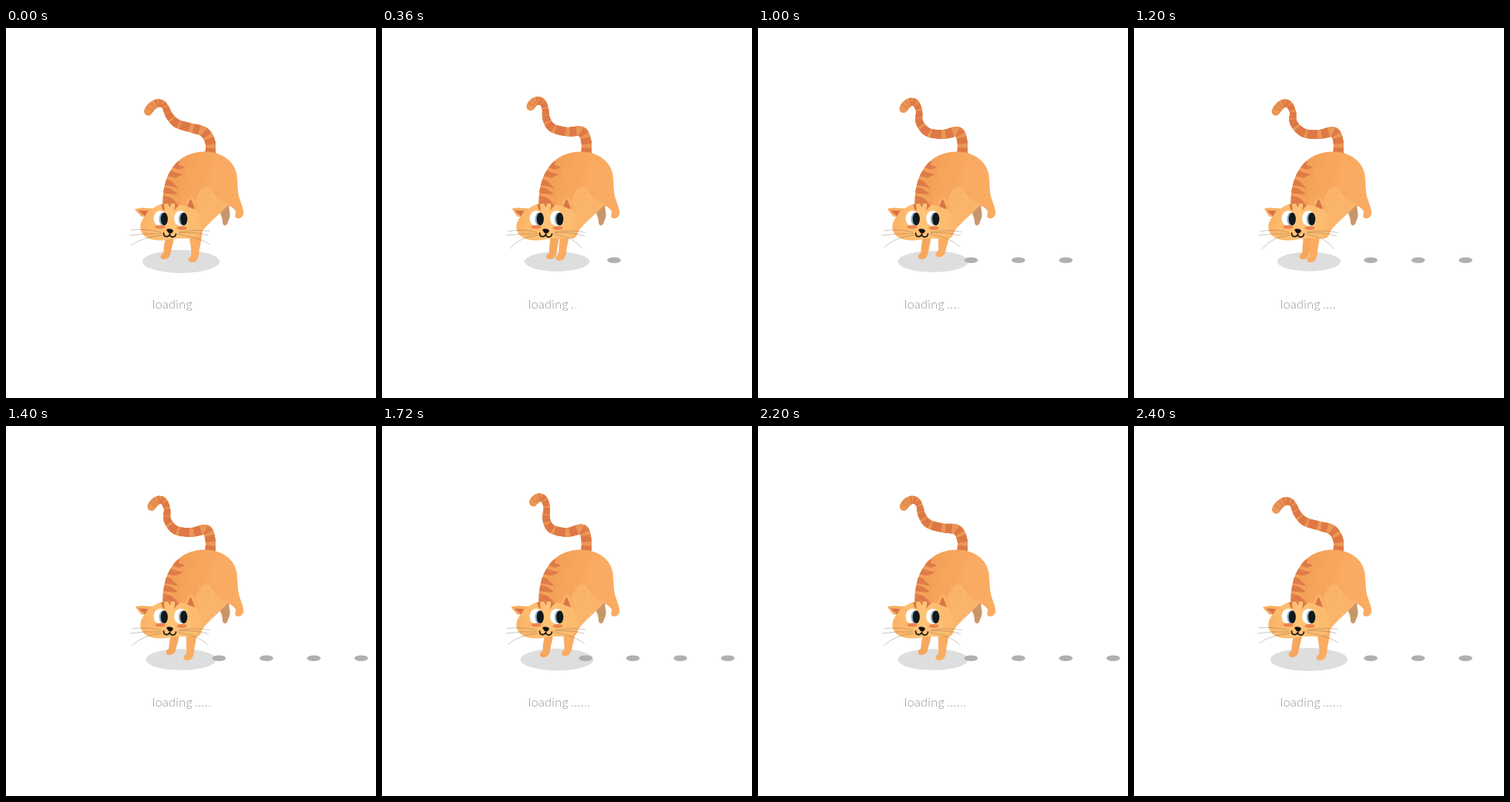
These frames come from a looping animation (480x480 px, 2.44 s). An HTML page with a canvas:

```html
<!DOCTYPE html>
<html lang="en">
<head>
<meta charset="utf-8">
<title>Loading cat</title>
<style>
html, body { margin: 0; width: 100%; height: 100%; overflow: hidden; background: #fff; }
canvas { display: block; }
</style>
</head>
<body>
<canvas id="stage" width="480" height="480"></canvas>
<script>
const ctx = document.getElementById('stage').getContext('2d');
const LOOP = 2440, STEP = 40;
const mix = (a, b, k) => a + (b - a) * k;
const clamp = v => Math.max(0, Math.min(1, v));

// Tail poses: matching spine points from the rump to the tip
const tailLow = [[265,163],[265,148],[257,135],[240,129.5],[222,124],[212,114],[207,103],[202,98],[195,98],[188,103],[184,109]];
const tailHigh = [[265,163],[265,147],[260,134],[240,138],[220,133],[214,120],[215,106],[212,95],[206,92],[201,94],[198,98]];
const tailBent = [[265,163],[265,147],[259,135],[240,138],[220,136],[207,123],[206,109],[201,99],[194,98],[187.5,103],[183.5,109]];
const tailWidths = [13, 13, 13, 11.5, 11, 9.5, 8, 9, 10.5, 11, 10.5];

const shapes = {
  farLeg: 'M277 238 L290 228 C288 235 292 241 290 246 L287 254 C284 258 281 256 281 252 C281 247 279 243 277 238 Z',
  body: 'M203.5 232 C203 212 206 195 216 181 C226 167 241 160.5 258 160.5 C280 160.5 297 173 299.5 191 C301 206 300 213 303 222 C306 230 308 236 308 241 C306 248 299 248 297.5 245 C297 241 300 239 296 235 L290 228 C280 238 268 248 258 259 C253 264 254 271 248 273 L215 273 Z',
  belly: 'M250 214 C255 203 264 204 268 212 C273 222 282 226 290 228 C280 238 268 248 258 259 C253 264 254 271 248 273 L238 273 C248 257 241 232 250 214 Z',
  haunch: 'M264 190 C267 177 287 179 296 190 C301 205 300 213 303 222 C306 230 308 236 308 241 C306 248 299 248 297.5 245 C297 241 300 239 296 235 C288 228 273 222 267 211 C263 204 263 197 264 190 Z',
  head: 'M182 242 C190 233 197 228 208 228 C218 227 227 229 234 231 L249 237 C254 245 256 262 249 270 C241 275 228 271 213 274 C202 277 186 276 179 269 C171 261 174 250 182 242 Z',
  stripes: 'M216 170 L225 173 L224 177 L232 181 L224 184 L214 180 Z M208 183 L219 187 L230 190 L220 194 L205 192 Z M203 194 L214 198 L224 208 L213 205 L203 204 Z M202 206 L213 208 L224 216 L211 215 L202 214 Z M202 217 L214 220 L223 228 L202 229 Z',
  brow: 'M201 229 L205 228 L206 237 L203 235 Z M210 228 L214 228 L213 233 Z M219 228 L225 229 L218 237 L219 232 Z'
};
for (const key in shapes) shapes[key] = new Path2D(shapes[key]);

function fill(path, color) {
  ctx.fillStyle = color;
  ctx.fill(path);
}

function oval(x, y, rx, ry, color) {
  ctx.fillStyle = color;
  ctx.beginPath();
  ctx.ellipse(x, y, rx, ry, 0, 0, 7);
  ctx.fill();
}

function stroke(path, color, width, cap = 'round') {
  ctx.strokeStyle = color;
  ctx.lineWidth = width;
  ctx.lineCap = cap;
  ctx.stroke(path);
}

// Catmull-Rom position at s, counted in points
function along(pts, s) {
  const i = Math.min(Math.floor(s), pts.length - 2), k = s - i;
  const b = pts[i], c = pts[i + 1], a = pts[i - 1] || b, d = pts[i + 2] || c;
  return [0, 1].map(n => b[n] + k / 2 * (c[n] - a[n]
    + k * (2 * a[n] - 5 * b[n] + 4 * c[n] - d[n] + k * (3 * (b[n] - c[n]) + d[n] - a[n]))));
}

function markCoat() {
  let seed = 7;
  const rnd = () => (seed = seed * 16807 % 2147483647) / 2147483647;
  ctx.save();
  ctx.clip(shapes.body);
  fill(shapes.stripes, '#de7b48');
  ctx.lineWidth = 0.8;
  for (let i = 0; i < 150; i++) {
    const x = 204 + rnd() * 96, y = 162 + rnd() * 72, a = rnd() * 6;
    ctx.strokeStyle = i % 2 ? 'rgba(222,125,60,.22)' : 'rgba(255,206,140,.25)';
    ctx.beginPath();
    ctx.arc(x, y, 2, a, a + 2);
    ctx.stroke();
  }
  ctx.restore();
}

function drawTail(t) {
  const u = 1200 - Math.abs(t - 1200);
  const [from, to, k] = u < 600 ? [tailLow, tailHigh, u / 600] : [tailHigh, tailBent, u / 600 - 1];
  const pts = from.map((p, i) => [mix(p[0], to[i][0], k), mix(p[1], to[i][1], k)]);
  const pass = (color, cap, shown) => {
    for (let s = 0; s < 9.95; s += 0.1) {
      if (!shown(s)) continue;
      const [x, y] = along(pts, s), [x2, y2] = along(pts, s + 0.13);
      const i = Math.floor(s), width = mix(tailWidths[i], tailWidths[i + 1], s - i);
      stroke(new Path2D(`M${x} ${y} L${x2} ${y2}`), color, width, cap);
    }
  };
  pass('#ea9757', 'round', s => s < 9.75);
  pass('#de7846', 'butt', s => s < 8 && Math.sin(s * 8) > (s < 3 ? -0.2 : -0.75));
  pass('#e68a4f', 'butt', s => s > 8 && s < 9.5 && Math.sin(s * 9) > 0);
}

function drawFrontLeg(top, foot, y, wide, color) {
  fill(new Path2D(`M${top - wide} 265 L${top - wide + 1} 276 C${foot - 3.5} 284 ${foot - 2.5} ${y - 10} ${foot - 3.5} ${y - 8}
    C${foot - 8.5} ${y - 5} ${foot - 8} ${y} ${foot - 2} ${y} C${foot + 4} ${y} ${foot + 6} ${y - 5} ${foot + 7} ${y - 12}
    C${foot + 7} 285 ${top + wide - 1} 280 ${top + wide} 265 Z`), color);
}

function drawEar(points, color) {
  const path = new Path2D('M' + points.join(' L') + ' Z');
  fill(path, color);
  ctx.lineJoin = 'round';
  stroke(path, color, 1.5);
}

function drawEye(white, pupil) {
  oval(white, 247, 8.5, 10, '#fff');
  oval(pupil - 2.2, 247.8, 4.5, 8.3, '#86acc2');
  oval(pupil, 247.8, 4.6, 8.3, '#12171b');
}

function drawHead(p) {
  drawEar([[187, 244], [176, 244], [168 + 2 * p, 235.5 - p], [176, 234], [192, 235]], '#f8ae60');
  drawEar([[231, 234], [236, 223], [240.5 - p, 218 + p], [246, 225], [251, 240]], '#f8b163');
  const coat = ctx.createLinearGradient(174, 0, 255, 0);
  coat.addColorStop(0, '#fbb365');
  coat.addColorStop(0.5, '#fec377');
  coat.addColorStop(1, '#fbb86b');
  fill(shapes.head, coat);
  drawEar([[173 + p, 237.5], [183, 238], [180, 243]], '#d97449');
  drawEar([[236, 231], [239.5, 223], [244, 234]], '#d97449');
  fill(shapes.brow, '#dc7845');
  drawEye(200, 205.3);
  drawEye(226.5, 230.7);
  oval(200, 258.2, 6.5, 2.4, '#ec8350');
  oval(228, 259.5, 6.5, 2.4, '#ec8350');
  fill(new Path2D('M208 262 C210 260 215 260 217 263 C216 266 213 268 211 266 Z'), '#111');
  stroke(new Path2D('M204.5 266 C204.5 272 211 272 212.5 267.5 C213 273 220 272 220.5 267'), '#1a1513', 1.7);
  const whiskers = `M201 265 Q182 260 ${162 + 2 * p} ${262 + 2 * p}
    M201 267 Q181 266 ${160.5 + p} 269 M202 269 Q178 271 ${162.5 + 4 * p} ${281.5 + 5 * p}
    M224 265 Q245 261 264 ${263.5 + 2 * p} M224 266 Q245 264 262.5 ${269 + p}
    M224 268 Q249 271 ${264 - 5 * p} ${280.5 + 6 * p}`;
  stroke(new Path2D(whiskers), 'rgba(105,80,60,.6)', 0.55);
}

function drawCat(t, phase, p) {
  drawTail(t);
  fill(shapes.farLeg, '#c99669');
  const swing = Math.sin(phase * 2 * Math.PI);
  drawFrontLeg(mix(212, 225, p), mix(207.5, 221.5, p), 300 - 3 * Math.max(0, -swing), 6.5, '#f7a75d');
  const coat = ctx.createLinearGradient(205, 190, 285, 215);
  coat.addColorStop(0, '#f09c54');
  coat.addColorStop(0.45, '#f6a55b');
  coat.addColorStop(1, '#fbac64');
  fill(shapes.body, coat);
  fill(shapes.belly, '#fbb46c');
  fill(shapes.haunch, '#faab62');
  markCoat();
  drawFrontLeg(mix(246, 235, p), mix(243.5, 231, p), 304 - 7 * Math.max(0, swing), mix(8.5, 6.5, p), '#fbac62');
  drawHead(p);
}

function drawPebbles(t) {
  for (let born = 0; born < t; born += 400) {
    const age = t - born;
    ctx.globalAlpha = clamp(0.3 + age / 170);
    oval(245.6 + age * 61.5 / 400, 301.3, 8.8, 3.8, '#b0b0b0');
  }
  ctx.globalAlpha = 1;
}

function drawLabel(t) {
  ctx.font = "300 16px Lato, 'Noto Sans', sans-serif";
  ctx.letterSpacing = '0.4px';
  ctx.fillStyle = '#929292';
  ctx.fillText('loading', 189.7, 364);
  for (let i = 0; i < 6; i++) {
    ctx.globalAlpha = clamp((t - i * 300) / 180) * (i < 4 ? 1 : 0.8);
    ctx.fillText('.', 245 + i * 4.3, 364);
  }
  ctx.globalAlpha = 1;
}

function draw(t) {
  const phase = t % 800 / 800;
  const p = 1 - Math.abs(1 - 2 * phase);
  ctx.fillStyle = '#fff';
  ctx.fillRect(0, 0, 480, 480);
  const rx = 50 - 8.7 * p;
  oval(227, 303, rx, rx * 0.3, '#dedede');
  drawPebbles(t);
  drawCat(t, phase, p);
  drawLabel(t);
}

function tick() {
  draw(Math.floor(performance.now() % LOOP / STEP) * STEP);
  requestAnimationFrame(tick);
}
tick();
</script>
</body>
</html>
```
